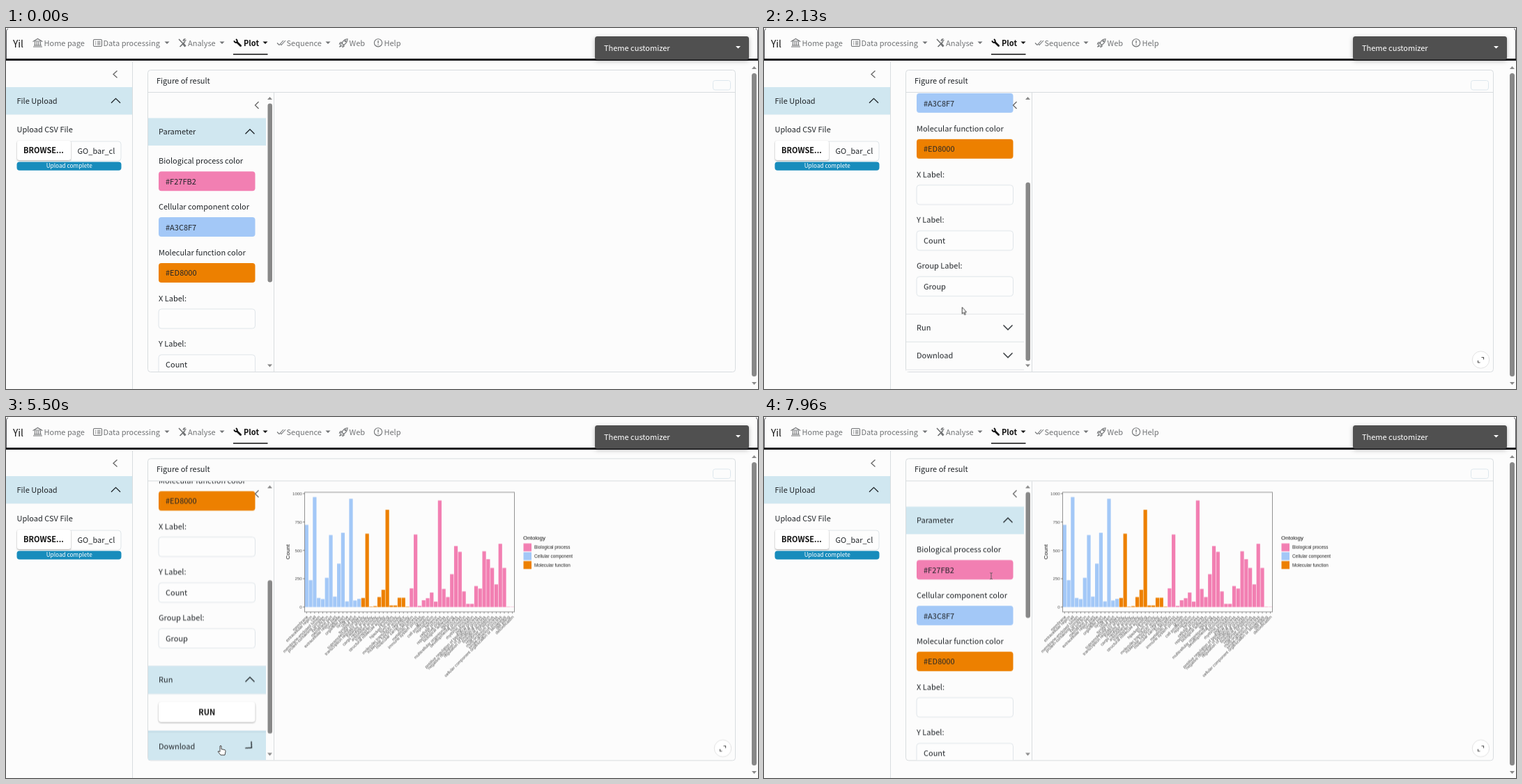
An HTML page for the animation above (8 s loop, 1079 px wide and 519 px high).

```html
<!DOCTYPE html>
<html lang="en">
<head>
<meta charset="utf-8">
<title>Bar plot walkthrough</title>
<style>
html, body { margin: 0; width: 100%; height: 100%; overflow: hidden; background: #fcfcfc; }
svg { display: block; width: 1079px; height: 519px; }
text { font: 11px "Noto Sans CJK SC", "Noto Sans CJK JP", "Noto Sans", sans-serif; fill: #212529; white-space: pre; }
.nav text { fill: #717375; }
.nav .on { fill: #111; font-weight: 700; }
.bold { font-weight: 700; fill: #111; }
.mid { text-anchor: middle; }
.end { text-anchor: end; }
.line { fill: none; stroke: #d8dcdf; }
.icon { fill: none; stroke: #717375; stroke-width: 1.1; }
.chev { fill: none; stroke: #20262a; stroke-width: 1.3; }
.grey { fill: #888; }
.head { fill: #d0e7f0; }
.ring { fill: #c0dce8; }
.field { fill: #fdfdfd; stroke: #dfe5e9; }
.button { fill: #fff; filter: drop-shadow(0 1px 1px #0005); }
.chart text { font: 6.4px "Liberation Sans", sans-serif; fill: #222; }
.chart .tick { font-size: 6.2px; fill: #4d4d4d; }
.chart .name { font-size: 6px; fill: #4d4d4d; }
.chart .title { font-size: 8px; fill: #111; }

/* 1% = 80 ms */
#main, #scroll, #thumb, #pointer, #pointer > *, #download, #chart, #zoom, .open, .ring, .turn {
  animation: 8s linear infinite;
}
#main { animation-name: settle; animation-timing-function: step-end; }
@keyframes settle { 0% { transform: none } 59.375%, 100% { transform: translateY(-.6px) } }

#scroll { animation-name: scroll; }
@keyframes scroll {
  0%, 14.25% { transform: translateY(0) }
  19.5% { transform: translateY(-144.5px); animation-timing-function: ease-out }
  23.6% { transform: translateY(-178px) }
  36%, 38% { transform: translateY(-179px) }
  41.25%, 70.6% { transform: translateY(-230.8px) }
  75%, 81.6% { transform: translateY(-414.4px) }
  89.375% { transform: translateY(-130px) }
  94.5%, 100% { transform: translateY(0) }
}
#thumb { animation-name: thumb; }
@keyframes thumb {
  0%, 14.25% { y: 108.5px; height: 257px }
  19.5% { y: 200.7px; height: 257px; animation-timing-function: ease-out }
  23.6%, 31.75% { y: 222px; height: 256.5px }
  36%, 38% { y: 213px; height: 234.5px }
  41.25%, 68.1% { y: 243.5px; height: 234.5px }
  70.6% { y: 212.4px; height: 181px }
  75%, 81.6% { y: 295px; height: 181px }
  89.375% { y: 167px; height: 181px }
  94.5%, 100% { y: 108.5px; height: 181px }
}
#download { animation-name: push; }
@keyframes push { 0%, 31.75% { transform: translateY(-56px) } 36%, 100% { transform: none } }

.open { animation-timing-function: step-end; }
.run .open { animation-name: runOpen; }
@keyframes runOpen { 0% { opacity: 0 } 31.75%, 100% { opacity: 1 } }
.run .ring { animation-name: runRing; animation-timing-function: step-end; }
@keyframes runRing { 0% { opacity: 0 } 31.75% { opacity: 1 } 45.25%, 100% { opacity: 0 } }
.save .open, .save .ring { animation-name: saveOpen; animation-timing-function: step-end; }
@keyframes saveOpen { 0% { opacity: 0 } 68.1%, 100% { opacity: 1 } }
.turn { transform-box: fill-box; transform-origin: center; }
.run .turn { animation-name: runTurn; }
@keyframes runTurn { 0%, 31.75% { transform: rotate(180deg) } 34.25%, 100% { transform: rotate(0) } }
.save .turn { animation-name: saveTurn; }
@keyframes saveTurn { 0%, 68.1% { transform: rotate(180deg) } 70.6%, 100% { transform: rotate(0) } }

#chart { animation-name: plot; animation-timing-function: step-end; }
@keyframes plot { 0% { opacity: 0 } 48.9%, 100% { opacity: 1 } }
#zoom { animation-name: zoom; animation-timing-function: step-end; }
@keyframes zoom { 0% { opacity: 0 } 4.4%, 100% { opacity: 1 } }

#pointer { animation-name: move; }
@keyframes move {
  0%, 2.25% { transform: translate(330px, -20px) }
  6.5% { transform: translate(264px, 150px) }
  11.75% { transform: translate(285px, 388px) }
  12.4%, 25.5% { transform: translate(286px, 390px) }
  29%, 35.5% { transform: translate(279px, 425px) }
  37% { transform: translate(280px, 409px) }
  41.25% { transform: translate(288px, 417px) }
  42.25%, 48.9% { transform: translate(288px, 420px) }
  52.375% { transform: translate(391px, 385px) }
  56%, 58.75% { transform: translate(430px, 340px) }
  62.5% { transform: translate(395px, 400px) }
  66.25%, 70.6% { transform: translate(308px, 472px) }
  75.75%, 81.6% { transform: translate(308px, 437px) }
  89.375% { transform: translate(302px, 365px) }
  98%, 100% { transform: translate(326px, 228px) }
}
#pointer > * { animation-timing-function: step-end; }
#arrow { animation-name: arrow; }
@keyframes arrow {
  0% { opacity: 1 } 27.5% { opacity: 0 } 36.25% { opacity: 1 }
  39.375% { opacity: 0 } 50% { opacity: 1 } 64.375%, 100% { opacity: 0 }
}
#hand { animation-name: hand; }
@keyframes hand {
  0% { opacity: 0 } 27.5% { opacity: 1 } 36.25% { opacity: 0 }
  39.375% { opacity: 1 } 50% { opacity: 0 } 64.375% { opacity: 1 } 83.75%, 100% { opacity: 0 }
}
#beam { animation-name: beam; }
@keyframes beam { 0% { opacity: 0 } 83.75%, 100% { opacity: 1 } }
</style>
</head>
<body>
<svg viewBox="0 0 1079 519">
  <defs>
    <clipPath id="pane"><rect x="204" y="93" width="169" height="401"/></clipPath>
    <path id="up" d="M0 6.5L6.5 0L13 6.5"/>
    <path id="caret" d="M0 0H7L3.5 3.6Z"/>
  </defs>
  <rect width="1079" height="519" fill="#fcfcfc"/>

  <g class="nav">
    <path d="M.5 45V5Q.5 2 3 1M1078.5 45V5Q1078.5 2 1076 1" fill="none" stroke="#55555a"/>
    <rect y="44" width="1079" height="3" fill="#18181c"/>
    <text x="10" y="27.5" style="font-size:13.8px;fill:#111">Yil</text>
    <text x="54.5" y="25.5">Home page</text>
    <text x="139.5" y="25.5">Data processing</text>
    <text x="261" y="25.5">Analyse</text>
    <text x="341" y="25.5" class="on">Plot</text>
    <text x="402.5" y="25.5">Sequence</text>
    <text x="492.5" y="25.5">Web</text>
    <text x="542.5" y="25.5">Help</text>
    <g fill="#717375">
      <use href="#caret" x="227.5" y="19.5"/><use href="#caret" x="306.5" y="19.5"/><use href="#caret" x="458.5" y="19.5"/>
      <use href="#caret" x="368.5" y="19.5" fill="#111"/>
    </g>
    <rect x="326" y="37" width="49.5" height="1.5" fill="#111"/>
    <g class="icon">
      <path d="M39.5 19L45.5 15.5L51.5 19ZM41.5 20V25M44.2 20V25M46.8 20V25M49.5 20V25M40 25H51M39 27H52"/>
      <path d="M127 16.5H136Q137.5 16.5 137.5 18V25Q137.5 26.5 136 26.5H127Q125.5 26.5 125.5 25V18Q125.5 16.5 127 16.5ZM128 19.3H129.3M131 19.3H135.5M128 21.6H129.3M131 21.6H135.5M128 24H129.3M131 24H135.5"/>
      <path d="M248 16L254 22.5M249.5 27L257 19.5" stroke-width="1.6"/>
      <path d="M254 22.5L257.5 26.5" stroke-width="2.8"/>
      <path d="M258.5 17.2L256.8 18.8L255.6 17.8L257 15.8Q254 15.6 254.2 19.2"/>
      <path d="M331.5 20.5L336.6 25.6" stroke="#111" stroke-width="2.8" stroke-linecap="round"/>
      <path d="M327.3 18.3Q328 21.5 331 20.8Q333 18.5 330 16" stroke="#111" stroke-width="2"/>
      <path d="M389 21.5L392 24.5L398 18M394 23.5L395 24.5L401 18"/>
      <path d="M482 22Q484.5 16 490 15.7Q490 21 484.5 24.5ZM482.5 20.5L479.5 20.8L478.5 23L481.5 22.6M485 23.5L485 26.5L483 27.5L483.3 24.8M480.8 24L478.5 27.2L482 25.5"/>
      <circle cx="487" cy="18.7" r="1"/>
      <circle cx="534" cy="21.3" r="5.6"/><path d="M534 18V22.3M534 23.5V24.8" stroke-width="1.3"/>
    </g>
    <rect x="845" y="12" width="221" height="33.5" rx="3.5" fill="#505050" style="filter:drop-shadow(0 2px 3px #0004)"/>
    <text x="858" y="32.5" style="fill:#fff">Theme customizer</text>
    <use href="#caret" x="1047" y="26" fill="#fff"/>
  </g>

  <path class="line" d="M181.5 48V519"/>
  <path class="chev" style="stroke:#666" d="M159.5 61.5L154 66.5L159.5 71.5"/>
  <rect class="head" y="85" width="181" height="39.5"/>
  <text x="15.5" y="109">File Upload</text>
  <use href="#up" class="chev" x="151" y="101.3"/>
  <text x="15.5" y="150">Upload CSV File</text>
  <rect class="field" x="90.5" y="163" width="74.5" height="28" rx="4"/>
  <rect class="button" x="16" y="162" width="77" height="28" rx="3"/>
  <text class="bold" x="25" y="180">BROWSE...</text>
  <text x="102.5" y="181">GO_bar_cl</text>
  <rect x="15.5" y="192.5" width="150" height="12.3" rx="4" fill="#188cbc"/>
  <text class="mid" x="90.7" y="201.3" style="font-size:8.25px;fill:#fff">Upload complete</text>

  <path class="grey" d="M1070 59H1077L1073.5 55ZM1070 509H1077L1073.5 513Z"/>
  <rect class="grey" x="1070" y="65" width="7" height="436" rx="3.5"/>

  <g id="main">
    <rect class="line" x="203.5" y="60.5" width="843" height="434" rx="4"/>
    <path class="line" d="M204 92.5H1046M384.5 93V494"/>
    <text x="216" y="80">Figure of result</text>
    <rect x="1014.5" y="75.5" width="25" height="13.5" rx="3" fill="none" stroke="#dde7ed"/>
    <g clip-path="url(#pane)"><g id="scroll"></g></g>
    <path class="chev" style="stroke:#666" d="M362.5 106L357.5 111L362.5 116"/>
    <path class="grey" d="M375 103H382L378.5 99ZM375 483.5H382L378.5 487.5Z"/>
    <rect id="thumb" class="grey" x="375.5" y="108.5" width="6.5" height="257" rx="3.2"/>
    <g id="chart" class="chart"></g>
    <g id="zoom">
      <circle cx="1028.5" cy="477" r="12.2" fill="#fff" stroke="#e2e2e2"/>
      <path d="M1029.5 473.5H1032.5V476.5M1024.5 478V481H1027.5" fill="none" stroke="#555" stroke-width="1.2"/>
    </g>
  </g>

  <g id="pointer" stroke="#333" stroke-width=".9" fill="#fff">
    <path id="arrow" d="M.5 0V9.5L2.6 7.6L4.1 11L5.5 10.4L4 7.1H6.8Z"/>
    <path id="hand" d="M-1 1Q0 0 1 1V5.5L6 6.5Q7.3 7 7 9L6 14H0L-4 9Q-3.6 7.6-1 9.3Z"/>
    <path id="beam" fill="none" stroke="#555" d="M-1.8-4Q0-4 0-3V4Q0 5-1.8 5M1.8-4Q0-4 0-3M0 4Q0 5 1.8 5"/>
  </g>
</svg>

<script>
const byId = id => document.getElementById(id);
const rect = (cls, x, y, w, h, rx = 0, fill = '') =>
  `<rect class="${cls}" x="${x}" y="${y}" width="${w}" height="${h}" rx="${rx}"${fill && ` fill="${fill}"`}/>`;
const text = (x, y, words, cls = '', more = '') =>
  `<text x="${x}" y="${y}" class="${cls}" ${more}>${words}</text>`;

const pink = '#f27fb2', blue = '#a3c8f7', orange = '#ed8000';

// Side pane
const field = (y, label, value, fill) =>
  text(219, y - 11.2, label) +
  (fill ? rect('', 219, y, 138.5, 28, 4, fill) : rect('field', 219, y + .3, 138.5, 28, 4)) +
  text(229, y + 18.4, value);
const button = (y, label, x = 288.2) =>
  rect('button', 219, y, 138.5, 29, 4) + text(x, y + 19, label, 'bold mid');
const header = (y, label) =>
  rect('ring', 204, y - 2.5, 169, 45.5) +
  rect('closed', 204, y + .5, 169, 40, 0, '#fcfcfc').replace('/>', ' style="opacity:var(--cover,0)"/>') +
  `<path class="line" style="stroke:#e3e6e8" d="M204 ${y}.5H373M204 ${y + 40}.5H373"/>` +
  rect('head open', 204, y + .3, 169, 40) +
  text(219, y + 24.4, label) +
  `<path class="chev turn" d="M343.5 ${y + 23}L350 ${y + 16.5}L356.5 ${y + 23}"/>`;

const fields = [
  ['Biological process color', '#F27FB2', pink],
  ['Cellular component color', '#A3C8F7', blue],
  ['Molecular function color', '#ED8000', orange],
  ['X Label:', ''], ['Y Label:', 'Count'], ['Group Label:', 'Group'],
];
byId('scroll').innerHTML =
  rect('head', 204, 129.5, 169, 39.5) + text(219, 153, 'Parameter') +
  '<use href="#up" class="chev" x="343.5" y="145.7"/>' +
  fields.map(([label, value, fill], i) => field(206.3 + 65.8 * i, label, value, fill)).join('') +
  button(641, 'RUN') +
  `<g class="run">${header(589, 'Run')}</g>` +
  `<g id="download" class="save">${rect('', 204, 685.5, 169, 300, 0, '#fcfcfc')}${header(685, 'Download')}` +
  field(762.8, 'Plot Width (inches):', '12') + field(828.6, 'Plot Height (inches):', '6') +
  button(868.5, 'DOWNLOAD', 295.5) +
  '<path d="M253.5 877H256.5V881H259.5L255 885.5L250.5 881H253.5ZM249 884H251.5L255 887.3L258.5 884H261V889H249Z" fill="#111"/></g>';

// Bar chart
const groups = [
  [blue, [725, 237, 970, 80, 70, 258, 635, 92, 383, 655, 50, 955, 58, 72]],
  [orange, [80, 647, 4, 8, 88, 152, 858, 14, 14, 82, 82, 4]],
  [pink, [165, 640, 10, 60, 78, 128, 48, 940, 160, 88, 290, 538, 487, 138, 28, 28, 185, 163, 492, 422,
    345, 200, 558, 345, 3, 2]],
];
const names = `membrane|extracellular region|cell|membrane-enclosed lumen|protein-containing complex|cell junction
|membrane part|extracellular region part|organelle|organelle part|synapse|cell part|synapse part|supramolecular complex
|transcription regulator activity|catalytic activity|cargo receptor activity|antioxidant activity
|transporter activity|structural molecule activity|binding|hijacked function|toxin activity
|molecular transducer activity|molecular function regulator|molecular carrier activity
|localization|metabolic process|immune system process|growth|cell proliferation|reproduction|behavior
|cellular process|reproductive process|biological adhesion|signaling|multicellular organismal process
|developmental process|locomotion|rhythmic process|pigmentation|positive regulation of biological process
|negative regulation of biological process|regulation of biological process|biological regulation
|response to stimulus|multi-organism process|single-organism process
|cellular component organization or biogenesis|cell killing|detoxification`.replace(/\n/g, '').split('|');

const zero = 273.8, scale = .163, step = 5.79, left = 428.7;
const bars = groups.flatMap(([fill, counts]) => counts.map(count => [fill, count]));
const legend = [[pink, 'Biological process'], [blue, 'Cellular component'], [orange, 'Molecular function']];
byId('chart').innerHTML =
  bars.map(([fill, count], i) =>
    rect('', left + i * step, zero - count * scale, 5.2, count * scale, 0, fill)).join('') +
  '<rect x="428.5" y="108.8" width="301" height="172" fill="none" stroke="#888" stroke-width=".9"/>' +
  [0, 250, 500, 750, 1000].map(n => {
    const y = zero - n * scale;
    return text(424.8, y + 2.2, n, 'tick end') + `<path d="M426 ${y}H428.5" stroke="#555" stroke-width=".8"/>`;
  }).join('') +
  names.map((name, i) => {
    const x = left + 2.6 + i * step;
    return `<path d="M${x} 281V283" stroke="#555" stroke-width=".7"/>` +
      text(0, 0, name, 'name end', `transform="translate(${x + 2.5} 288.5) rotate(-45)"`);
  }).join('') +
  text(0, 0, 'Count', 'title mid', 'transform="translate(407 194.5) rotate(-90)"') +
  text(742, 177, 'Ontology', 'title') +
  legend.map(([fill, label], i) =>
    rect('', 742.5, 182.3 + 12.7 * i, 11.5, 11.4, 0, fill) + text(758, 190.3 + 12.7 * i, label)).join('');
</script>
</body>
</html>
```
